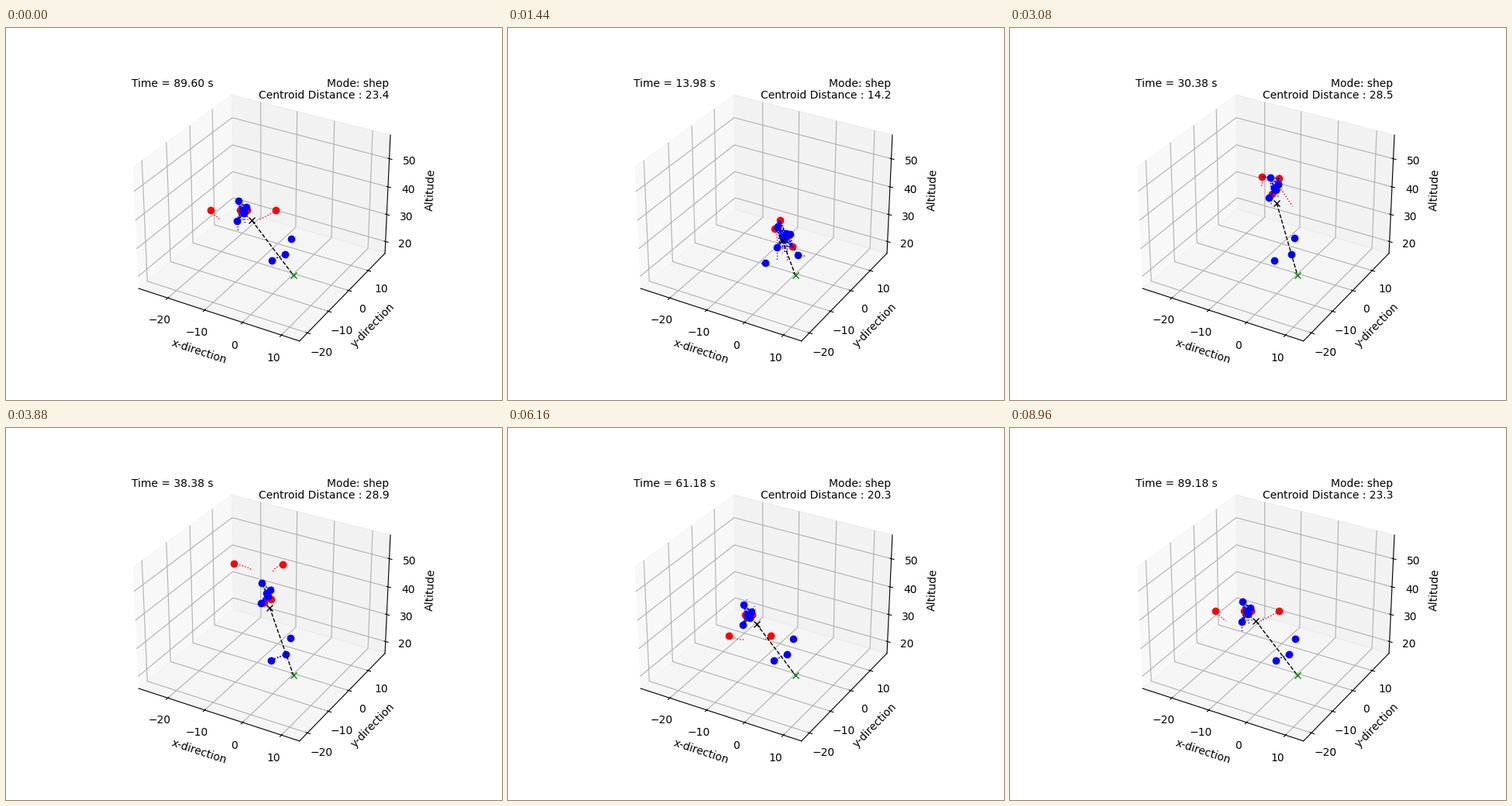
Animation, 640 px wide and 480 px high, one loop 9000 ms. Source, as a matplotlib script:

```python
import numpy as np
import matplotlib.pyplot as plt
from matplotlib.animation import FuncAnimation

FRAMES, INTERVAL = 225, 40
STEPS, DT = 4501, 0.02      # simulation samples
STRIDE, TAIL = 20, 250      # samples per frame, samples per trail
REACH = 21                  # link range in pixels
BASE = np.array([371, 319.3])

t = np.arange(STEPS) * DT

# Flock centre in pixels and its distance: time, x, y, distance
KEYS = np.array([
    (0, 352, 308, 6), (13.98, 353.6, 269, 14.2), (22.78, 345.6, 223, 24.6),
    (30, 341, 206, 28.4), (38.38, 335.5, 213, 28.9), (61.18, 309.3, 241, 20.3),
    (76.38, 307.7, 265, 18.0), (89.4, 305, 235.8, 23.35)])


def glide(time, value):
    """Smooth cubic path through the key values."""
    slope = np.gradient(value, time, axis=0)
    k = np.clip(np.searchsorted(time, t, "right") - 1, 0, len(time) - 2)
    h = (time[k + 1] - time[k])[:, None]
    s = (t - time[k])[:, None] / h
    return ((1 + 2 * s) * (1 - s) ** 2 * value[k]
            + s * (1 - s) ** 2 * h * slope[k]
            + s * s * (3 - 2 * s) * value[k + 1]
            + s * s * (s - 1) * h * slope[k + 1])


def settle(end, offset, tau=11):
    """Exponential approach to end from end + offset."""
    return np.array(end) + np.outer(np.exp(-(t - 14) / tau), offset)


def wave(start, period):
    return np.sin(2 * np.pi * (t - start) / period)


def pulse(mid, width):
    return np.exp(-((t - mid) / width) ** 2)


path = glide(KEYS[:, 0], KEYS[:, 1:])
centre, dist = path[:, :2], path[:, 2]

# Sheep: an almost rigid formation and three strays
spread = 1 + 0.8 * np.exp(-t / 4)
formation = [(-5, -12.6), (5, -4), (0, 0), (2.3, 3.6), (-6.5, 13.3)]
flock = [centre + np.outer(spread, o) for o in formation]
strays = [settle((360.2, 291.5), (14, 1.7), 9.5),
          settle((343.3, 299.5), (-11, 3)),
          settle((367.7, 271.8), (-3.5, -5.5))]
hub = 0.75 * np.mean(flock, axis=0) + 0.25 * np.mean(strays, axis=0)

# Herders: two swing out to both sides, two bob close to the centre
reach = np.minimum(1, t / 36) * (28 + 16 * wave(61.5, 24))
sway = -3 - 7 * wave(28.6, 38.2)
swoop = 50 * wave(48, 42) * pulse(48, 18)
tilt = 18 * pulse(20, 9)
herders = [centre + np.column_stack([sway + side * reach, swoop + side * tilt])
           for side in (-1, 1)]
for dx, peak in [(-3, 18), (6, 24)]:
    bob = -28 * wave(peak - 10, 40) * pulse(20, 20)
    herders.append(centre + np.column_stack([np.full(STEPS, dx), bob]))

sheep = flock + strays
agents = np.array(sheep + herders)
colors = ["b"] * len(sheep) + ["r"] * len(herders)
first, second = np.triu_indices(len(agents), 1)

fig = plt.figure(figsize=(6.4, 4.8), dpi=100)
ax = fig.add_subplot(projection="3d")
ax.set_xlim(-28.08, 14.57, view_margin=0)
ax.set_ylim(-23.62, 19.03, view_margin=0)
ax.set_zlim(15.6, 58.25, view_margin=0)
ax.set(xticks=range(-20, 11, 10), yticks=range(-20, 11, 10),
       zticks=range(20, 51, 10), xlabel="x-direction",
       ylabel="y-direction", zlabel="Altitude")
clock = ax.text2D(0.05, 0.95, "", transform=ax.transAxes)
ax.text2D(0.95, 0.95, "Mode: shep", ha="right", transform=ax.transAxes)
gauge = ax.text2D(0.95, 0.91, "", ha="right", transform=ax.transAxes)

# Pixel-space layer for everything that moves
top = fig.add_axes([0, 0, 1, 1])
top.set_xlim(0, 640)
top.set_ylim(480, 0)
top.axis("off")


def line(style, **kw):
    return top.plot([], [], style, **kw)[0]


trails = [line(c + ":", lw=1, zorder=2) for c in colors]
herd_dots = line("ro", zorder=3)
sheep_dots = line("bo", zorder=4)
links = line("b:", lw=1, zorder=5)
rope = line("k--", lw=1, zorder=6)
mark = line("kx", zorder=7)
top.plot(*BASE, "gx", zorder=8)


def update(i):
    k = (STRIDE * i - 21) % STEPS
    now = agents[:, k]
    for trail, track in zip(trails, agents):
        trail.set_data(*track[max(0, k - TAIL):k + 1][::-10].T)
    sheep_dots.set_data(*now[:len(sheep)].T)
    herd_dots.set_data(*now[len(sheep):].T)

    # Each link runs there and back, so its dots interleave
    a, b = now[first], now[second]
    near = np.hypot(*(a - b).T) < REACH
    gap = np.full_like(a, np.nan)
    links.set_data(*np.stack([a, b, a, gap], 1)[near].reshape(-1, 2).T)

    rope.set_data(*np.array([hub[k], BASE]).T)
    mark.set_data(*hub[k][:, None])
    clock.set_text(f"Time = {t[k]:.2f} s")
    gauge.set_text(f"Centroid Distance : {dist[k]:.1f}")
    return []


anim = FuncAnimation(fig, update, frames=FRAMES, interval=INTERVAL,
                     repeat=True, repeat_delay=0, blit=False)
plt.show()
```
